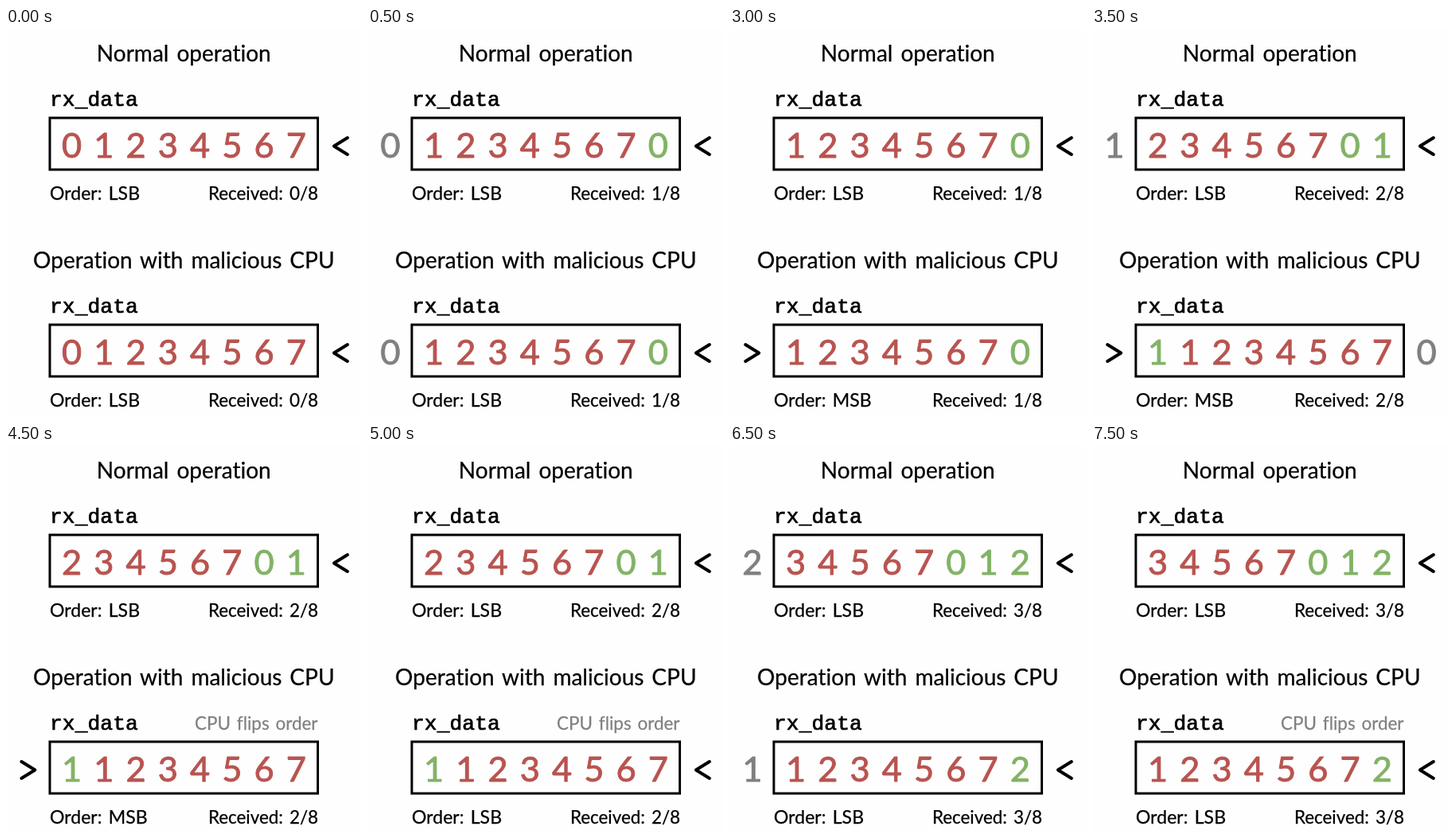
An HTML page that plays this animation: 447 px wide and 489 px high, repeating every 8000 ms.

```html
<!DOCTYPE html>
<html lang="en">
<head>
<meta charset="utf-8">
<title>Shift register order</title>
<style>
  html, body { margin: 0; width: 100%; height: 100%; overflow: hidden; background: #fefefe; }
  svg { display: block; width: 447px; height: 489px; }
  text {
    font: 23.1px Lato, sans-serif; font-variant-ligatures: none; word-spacing: .1em;
    stroke-width: .25; stroke-linejoin: round;
  }
  .title { font-size: 28px; text-anchor: middle; }
  .name { font: 26.4px "Liberation Mono", monospace; stroke-width: .7; }
  .digit { font-size: 43.4px; text-anchor: middle; stroke-width: .9; }
  .end { font-size: 22.4px; text-anchor: end; }
  .box, .arrow { fill: none; stroke: #000; stroke-width: 3; }
  .arrow { stroke-width: 4; stroke-linecap: round; stroke-linejoin: round; }
</style>
</head>
<body>
<svg id="stage" viewBox="0 0 447 489"></svg>
<script>
const LOOP = 8000, TICK = 500, PERIOD = 3000, OFFSET = 2500;
const RED = '#b85450', GREEN = '#82b366', GREY = '#808080';
const LEFT = 28, RIGHT = 420;
const stage = document.getElementById('stage');

const text = (x, y, str, cls = '', color = '#000') =>
  `<text x="${x}" y="${y}" class="${cls}" fill="${color}" stroke="${color}">${str}</text>`;
const digit = (x, value, color) => text(x, 163.3, value, 'digit', color);

// Shift in one digit per step; with flipping, every second one enters from the left.
function shiftIn(steps, flipping) {
  const cells = Array.from({ length: 8 }, (_, i) => ({ value: i, color: RED }));
  let dropped;
  for (let k = 0; k < steps; k++) {
    const added = { value: k, color: GREEN };
    if (flipping && k % 2) {
      dropped = { ...cells.pop(), x: RIGHT };
      cells.unshift(added);
    } else {
      dropped = { ...cells.shift(), x: LEFT };
      cells.push(added);
    }
  }
  return { cells, dropped };
}

function panel(y, title, steps, phase, flipping) {
  const { cells, dropped } = shiftIn(steps, flipping);
  const flips = steps - (phase < 1500 ? 1 : 0);
  const msb = flipping && flips % 2 === 1;
  return `<g transform="translate(0 ${y})">` +
    text(223.3, 42, title, 'title') +
    text(55, 98, 'rx_data', 'name') +
    (flipping && phase >= 1000 && phase < 2500
      ? text(391.5, 98, 'CPU flips order', 'end', GREY) : '') +
    '<rect class="box" x="55" y="113" width="336.5" height="65"/>' +
    cells.map((c, i) => digit(82.5 + 40.25 * i, c.value, c.color)).join('') +
    (dropped && phase < 500 ? digit(dropped.x, dropped.value, GREY) : '') +
    `<path class="arrow" d="${msb ? 'M19.4 138L36.4 148.5L19.4 159' : 'M428.8 138L411.8 148.5L428.8 159'}"/>` +
    text(55, 215.5, `Order: ${msb ? 'MSB' : 'LSB'}`) +
    text(392, 215.5, `Received: ${steps}/8`, 'end') +
    '</g>';
}

let shown = -1;
function draw() {
  const tick = Math.floor(performance.now() % LOOP / TICK);
  if (tick !== shown) {
    shown = tick;
    const time = tick * TICK + OFFSET;
    const steps = Math.floor(time / PERIOD), phase = time % PERIOD;
    stage.innerHTML =
      panel(0, 'Normal operation', steps, phase, false) +
      panel(260, 'Operation with malicious CPU', steps, phase, true);
  }
  requestAnimationFrame(draw);
}
draw();
</script>
</body>
</html>
```
